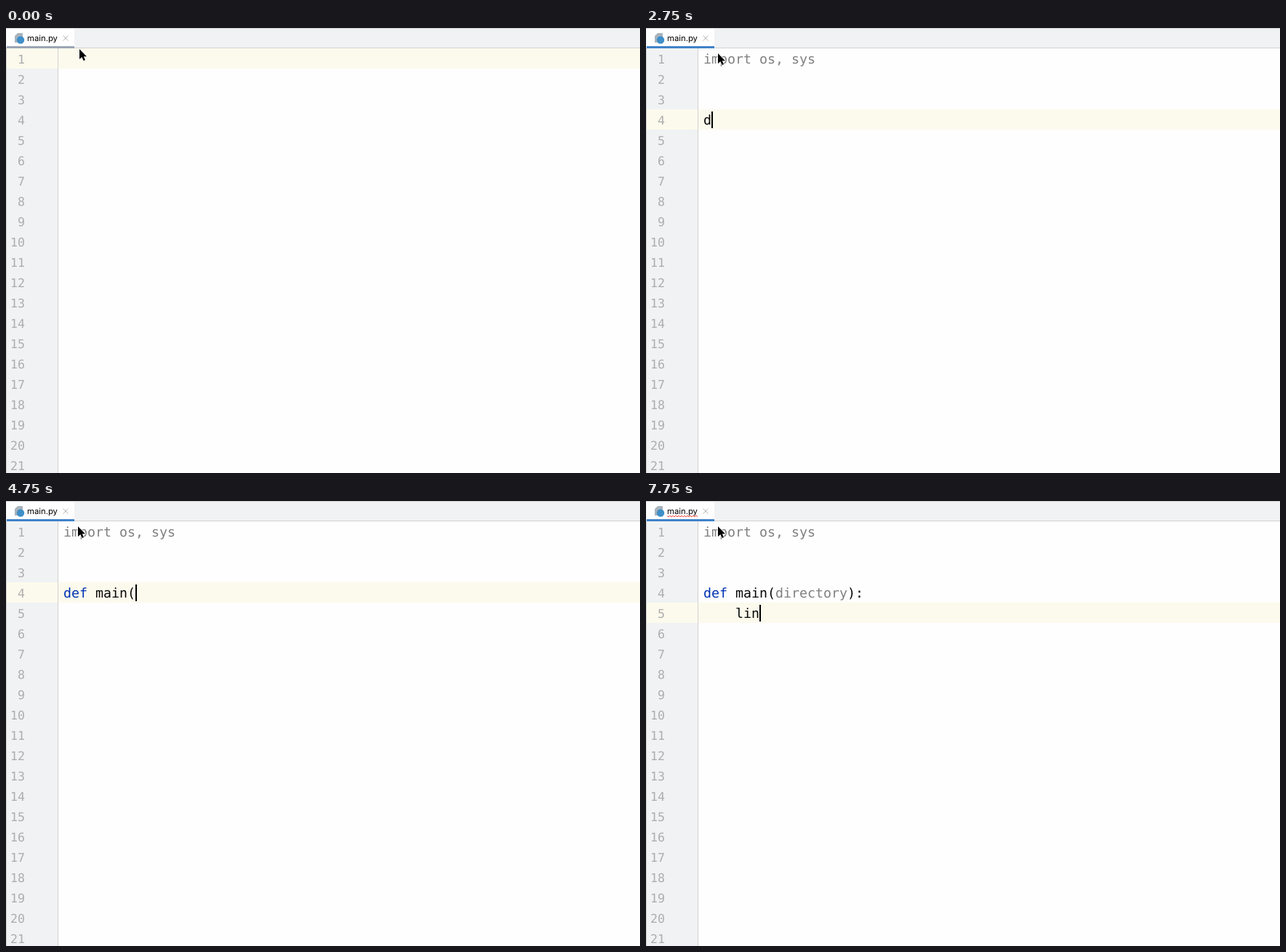
Recreate the animation shown at these times as an HTML page. Size 872 px wide and 613 px high, loop 8000 ms.

```html
<!DOCTYPE html>
<html lang="en">
<head>
<meta charset="utf-8">
<title>Code completion</title>
<style>
  html, body { margin: 0; width: 100%; height: 100%; overflow: hidden; background: #fff; }
  svg { display: block; width: 872px; height: 613px; }
  text { white-space: pre; text-rendering: geometricPrecision; }
  .code { font: 18.27px "DejaVu Sans Mono", monospace; }
  .num { font: 16.6px "DejaVu Sans Mono", monospace; fill: #adadad; text-anchor: end; }
  .tab { font: 11.3px Inter, sans-serif; }
  .tip { font: 11.2px Inter, sans-serif; fill: #707070; }
  .shadow { filter: drop-shadow(0 4px 5px rgba(0, 0, 0, .32)); }
</style>
</head>
<body>
<svg id="stage" viewBox="0 0 872 613"></svg>
<script>
const LOOP = 8000, CHAR = 11, LEFT = 79, ROW = 28, ITEM = 25;
const BLACK = '#080808', GREY = '#808080', KEY = '#0033b3', MATCH = '#2470b3', LOGO = '#3f8fc9';

const rect = (x, y, w, h, fill, extra = '') =>
  `<rect x="${x}" y="${y}" width="${w}" height="${h}" fill="${fill}" ${extra}/>`;
const line = (d, color, width = 1) =>
  `<path d="${d}" fill="none" stroke="${color}" stroke-width="${width}"/>`;
const dot = (x, y, r, fill) => `<circle cx="${x}" cy="${y}" r="${r}" fill="${fill}"/>`;
const text = (cls, x, y, body, extra = '') =>
  `<text class="${cls}" x="${x}" y="${y}" ${extra}>${body}</text>`;
const span = (body, color) => `<tspan fill="${color}">${body}</tspan>`;
const rowTop = n => ROW * n;

// Completion rows: "text~tag~right column"; a leading * marks a keyword.
const menus = {
  imports: { x: 53, y: 55, w: 529, shown: 11.5, prefix: 1, items: [
    'import os, sys~  gpt', 'import os~  gpt', '*import', 'import numpy as np~  gpt',
    'import argparse~  gpt', 'import os, sys, argparse, time,~ …',
    'import os, sys, time, datetime,~ …', 'import os, sys, time, json,~  gpt',
    'import sys, os~  gpt', 'import sys, os, argparse~  gpt',
    'import sys, os, argparse, time~  …', 'import sys, os, argparse, time'] },
  defs: { x: 53, y: 139, w: 529, shown: 11.5, prefix: 1, items: [
    '*def', 'def main():~  gpt', 'def main(args):~  gpt', 'def main(argv):~  gpt',
    'def get_args():~  gpt', 'def parse_args():~  gpt', 'def get_path(path):~  gpt',
    'def read_file(path):~  gpt', 'def load_data(path):~  gpt', 'def get_file_list(path):~  gpt',
    '*del', 'def create_dir(path):'] },
  names: { x: 97, y: 139, w: 500, shown: 10, prefix: 0, items: [
    'main():~  gpt', 'main(args):~  gpt', 'get_args():~  gpt', 'parse_args():~  gpt',
    'get_path(path):~  gpt', 'read_file(path):~  gpt', 'load_data(path):~  gpt',
    'get_file_list(path):~  gpt', 'create_dir(path):~  gpt', 'run(args):~  gpt'] },
  mains: { x: 97, y: 139, w: 449, shown: 11, prefix: 4, items: [
    'main():~  gpt', 'main(args):~  gpt', 'main(argv):~  gpt', 'main(path):~  gpt',
    'main(filename):~  gpt', 'main(input_path):~  gpt', 'main(model_path):~  gpt',
    'main(data_dir):~  gpt', 'main(config):~  gpt', 'main(argv=None):~  gpt',
    'main_loop():~  gpt'] },
  dirs: { x: 152, y: 139, w: 529, shown: 10, prefix: 3, items: [
    'directory):~  gpt', 'dir_path, model_path, model_name,',
    'dir_path, model_path, output_path):~~full-l…', 'dir_path, model_path, output_path,~~full-li…',
    'dir_path, model_path, save_path):', 'dir_path, model_path, save_path,~…',
    'dir_path, model_path, train_path,', 'dirname):~  gpt', 'dirname, args):~  gpt',
    'dirs, args):~  gpt'] }
};

const imports = [['import os, sys', GREY]];
const def = (...rest) => [['def ', KEY], ...rest];
const plain = s => [s, BLACK];

// Each step changes only the listed parts of the editor state.
const start = { code: {}, row: 1, col: -1, focus: false, mouse: [101, 29], menu: null, mark: false, error: false };
const steps = [
  [250, { col: 0, focus: true, mouse: [99, 35] }],
  [750, { col: 1, code: { 1: [plain('i')] } }],
  [1250, { menu: 'imports' }],
  [1750, { menu: null, col: 14, code: { 1: [['import', KEY], plain(' os, sys')] } }],
  [2000, { code: { 1: imports }, mark: true }],
  [2250, { row: 3, col: 0 }],
  [2500, { row: 4, mark: false }],
  [2750, { col: 1, code: { 4: [plain('d')] } }],
  [3250, { menu: 'defs' }],
  [3500, { menu: null, col: 4, code: { 4: def() } }],
  [3750, { menu: 'names' }],
  [4000, { menu: null }],
  [4250, { col: 8, code: { 4: def(plain('main')) } }],
  [4500, { menu: 'mains' }],
  [4750, { menu: null, col: 9, code: { 4: def(plain('main(')) } }],
  [5500, { col: 10, code: { 4: def(plain('main(d')) }, error: true }],
  [5750, { col: 12, code: { 4: def(plain('main(dir')) } }],
  [6250, { menu: 'dirs' }],
  [6500, { menu: null, col: 20, code: { 4: def(plain('main(directory):')) } }],
  [6750, { row: 5, col: 4 }],
  [7250, { code: { 4: def(plain('main('), ['directory', GREY], plain('):')) } }],
  [7500, { col: 5, code: { 5: [plain('    l')] } }],
  [7750, { col: 7, code: { 5: [plain('    lin')] } }]
];

function stateAt(t) {
  const s = { ...start };
  for (const [at, change] of steps) {
    if (at > t) break;
    Object.assign(s, change, { code: { ...s.code, ...change.code } });
  }
  return s;
}

function tabBar(s) {
  let wave = 'M29 20.5';
  for (let x = 31; x <= 71; x += 2) wave += `L${x} ${x % 4 === 3 ? 22 : 20}`;
  return rect(0, 0, 872, 28, '#f1f2f3') + rect(0, 0, 872, 1, '#d1d1d1') +
    rect(0, 27, 872, 1, '#d1d1d1') + rect(1, 1, 93, 26, '#fff') +
    rect(1, 25, 93, 3, s.focus ? '#4083c9' : '#9ba5b4') +
    '<path d="M16 7H23V20H12V11Z" fill="#a9b3bb"/>' + dot(20, 16.5, 5.2, LOGO) +
    text('tab', 29, 18, 'main.py') + line('M78.5 10.5L85.5 17.5M85.5 10.5L78.5 17.5', '#b6b6b6') +
    (s.error ? line(wave, '#f04a3e') : '');
}

function editor(s) {
  let out = rect(0, 0, 872, 613, '#fefefe') + rect(1, 28, 70, 585, '#f1f2f3') +
    rect(1, rowTop(s.row), 871, ROW, '#fcfaed') + rect(71, 28, 1, 585, '#d2d2d2') +
    rect(0, 0, 1, 613, '#d1d1d1');
  if (s.mark) out += rect(200, 28, 33, ROW, '#e9e5fb');
  for (let n = 1; n <= 21; n++) out += text('num', 26, rowTop(n) + 21, n);
  for (const n in s.code)
    out += text('code', LEFT, rowTop(n) + 21, s.code[n].map(p => span(...p)).join(''));
  if (s.col >= 0) out += rect(LEFT + s.col * CHAR, rowTop(s.row) + 3, 2, 23, '#000');
  return out;
}

function footer(x, y, w) {
  const hat = (at) => `M${at} ${y + 1}l3.5 -4l3.5 4`;
  return line(hat(x + 6) + hat(x + 51), '#707070') +
    line(`M${x + 19} ${y - 4}v8m-3.2 -3.2l3.2 3.2l3.2 -3.2M${x + 65} ${y + 4}v-8m-3.2 3.2l3.2 -3.2l3.2 3.2`, '#707070', 1.1) +
    text('tip', x + 27, y + 4, 'and') +
    text('tip', x + 72, y + 4, 'will move caret down and up in the editor') +
    text('tip', x + 296, y + 4, 'Next Tip', `style="fill:${MATCH}"`) +
    [-5, 0, 5].map(d => dot(x + w - 12, y + d, 1.5, '#6e6e6e')).join('');
}

function menuItem(item, i, m) {
  const [raw, tag = '', right = 'full-line'] = item.split('~');
  const bold = raw[0] === '*', label = bold ? raw.slice(1) : raw;
  const y = m.y + 20 + ITEM * i;
  const body = span(label.slice(0, m.prefix), MATCH) + span(label.slice(m.prefix), '#000') + span(tag, '#8a8a8a');
  const main = text('code', m.x + 26, y, body, bold ? 'font-weight="bold" style="font-weight:bold"' : '');
  if (bold) return main;
  return dot(m.x + 14, y - 6, 7, LOGO) + main +
    text('code', m.x + m.w - 12, y, right, 'text-anchor="end" fill="#8a8a8a"');
}

function popup(m) {
  const { x, y, w } = m, list = Math.floor(m.shown * ITEM), h = list + 23;
  return rect(x - 19, y - 13, w + 37, h + 36, '#000', 'opacity=".025"') +
    `<g class="shadow">${rect(x, y, w, h, '#f7f7f7')}</g>` +
    `<clipPath id="list">${rect(x, y + 1, w, list, '#000')}</clipPath>` +
    `<g clip-path="url(#list)">${rect(x, y + 1, w, ITEM, '#dedede')}` +
    m.items.map((item, i) => menuItem(item, i, m)).join('') + '</g>' +
    (m.shown % 1 ? rect(x + w - 9, y + 3, 7, 62, '#7d7d7d', 'rx="1.5"') : '') +
    footer(x, y + h - 11, w) +
    rect(x - .5, y + .5, w, h - 1, 'none', 'stroke="#bcbcbc"');
}

const pointer = ([x, y]) =>
  `<path transform="translate(${x} ${y})" d="M0 0V14L3.3 11L5.6 16L8 15L5.8 10.2H10Z" ` +
  'stroke="#fff" stroke-width="1.6" paint-order="stroke" stroke-linejoin="round"/>';

const stage = document.getElementById('stage');
let shown = -1;

function draw(t) {
  const step = steps.filter(([at]) => at <= t).length;
  if (step === shown) return;
  shown = step;
  const s = stateAt(t);
  stage.innerHTML = editor(s) + tabBar(s) + (s.menu ? popup(menus[s.menu]) : '') + pointer(s.mouse);
}

const origin = performance.now();
function tick() {
  draw((performance.now() - origin) % LOOP);
  requestAnimationFrame(tick);
}
tick();
</script>
</body>
</html>
```
